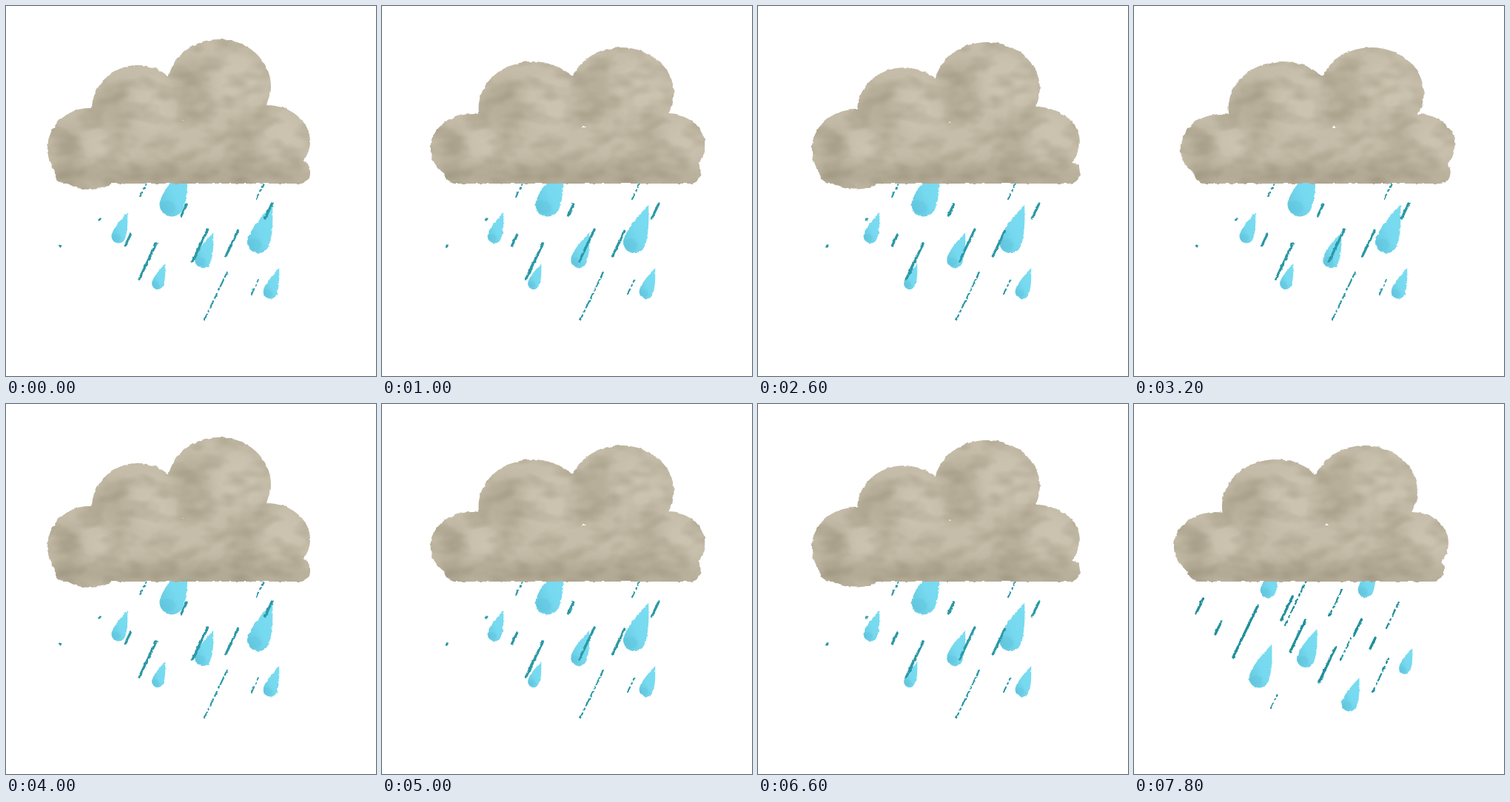
Recreate the animation shown at these times as an HTML page. Size 500 by 500 pixels, loop 8010 ms.

```html
<!DOCTYPE html>
<html lang="en">
<head>
<meta charset="utf-8">
<title>Rain cloud</title>
<style>
  html, body { margin: 0; width: 100%; height: 100%; overflow: hidden; background: #fff; }
  svg { display: block; width: 100vw; height: 100vh; }
</style>
</head>
<body>
<svg id="stage" viewBox="0 0 500 500">
  <defs>
    <filter id="paper" x="-5%" y="-5%" width="110%" height="110%" color-interpolation-filters="sRGB">
      <feTurbulence class="noise" type="fractalNoise" baseFrequency="0.12" numOctaves="2"/>
      <feColorMatrix values="1 0 0 0 0  0 1 0 0 0  0 0 1 0 0  0 0 0 0 1" result="edge"/>
      <feDisplacementMap in="SourceGraphic" in2="edge" scale="4" xChannelSelector="R" yChannelSelector="G" result="shape"/>
      <feTurbulence type="fractalNoise" baseFrequency="0.03 0.05" numOctaves="2" seed="9"/>
      <feColorMatrix values="0 0 0 0 .42  0 0 0 0 .38  0 0 0 0 .28  .5 0 0 0 -.2"/>
      <feComposite in2="shape" operator="in" result="wash"/>
      <feMerge><feMergeNode in="shape"/><feMergeNode in="wash"/></feMerge>
    </filter>
    <filter id="rough" x="-5%" y="-5%" width="110%" height="110%" color-interpolation-filters="sRGB">
      <feTurbulence class="noise" type="fractalNoise" baseFrequency="0.2" numOctaves="2"/>
      <feColorMatrix values="1 0 0 0 0  0 1 0 0 0  0 0 1 0 0  0 0 0 0 1" result="edge"/>
      <feDisplacementMap in="SourceGraphic" in2="edge" scale="3" xChannelSelector="R" yChannelSelector="G"/>
    </filter>
    <filter id="soft" x="-60%" y="-60%" width="220%" height="220%">
      <feGaussianBlur stdDeviation="9"/>
    </filter>
    <linearGradient id="water" x1="0.7" y1="0" x2="0.3" y2="1">
      <stop offset="0" stop-color="#7bddf1"/>
      <stop offset=".6" stop-color="#76d9ef"/>
      <stop offset="1" stop-color="#64c8df"/>
    </linearGradient>
  </defs>
</svg>
<script>
const NS = 'http://www.w3.org/2000/svg';
const stage = document.getElementById('stage');
const STEP = 200, LOOP = 8010, DRIFT = 2.9, FLOOR = 239, SLANT = .48;

function add(parent, tag, attrs = {}) {
  const el = document.createElementNS(NS, tag);
  for (const k in attrs) el.setAttribute(k, attrs[k]);
  return parent.appendChild(el);
}

// Every tear leans the same way; its length follows from its radius
const LEAN = Math.atan2(1.3, 3.4) * 180 / Math.PI;
function drop(parent, [x, y, r]) {
  const len = 3.6 * r;
  const d = `M0 ${-len}C${r * .42} ${-len * .7} ${r} ${-len * .34} ${r} 0` +
    `A${r} ${r} 0 0 1 ${-r} 0C${-r} ${-len * .34} ${-r * .42} ${-len * .7} 0 ${-len}Z`;
  const g = add(parent, 'g', { transform: `translate(${x} ${y}) rotate(${LEAN})` });
  add(g, 'path', { d, fill: 'url(#water)' });
  add(g, 'ellipse', { cx: -r * .2, cy: r * .3, rx: r * .6, ry: r * .5, fill: '#58bdd7', opacity: .25 });
}

// Streak: lower end and height
function streak(parent, [x, y, h], dashed) {
  add(parent, 'line', {
    x1: x, y1: y, x2: x + h * SLANT, y2: y - h,
    'stroke-width': dashed ? 2.2 : 3.3,
    'stroke-dasharray': dashed ? '7 5 2 4 10 4' : 'none'
  });
}

function makeRain({ drops, still, blown, color }) {
  const el = add(stage, 'g', { stroke: 'none' });
  const layer = attrs => add(el, 'g', { filter: 'url(#rough)', 'stroke-linecap': 'round', ...attrs });
  const tears = layer(), fixed = layer({ stroke: color });
  const mover = add(el, 'g');
  const wind = mover.appendChild(layer({ stroke: color }));
  drops.forEach(d => drop(tears, d));
  still.forEach(s => streak(fixed, s, true));
  blown.forEach(s => streak(wind, s, false));
  return { el, mover };
}

// Lobes are ellipses; a body and a foot join them
function makeCloud({ lobes, foot: [left, right], squash }, i) {
  const el = add(stage, 'g');
  const paint = add(add(el, 'g', { filter: 'url(#paper)' }), 'g', {
    transform: `translate(232 ${FLOOR}) scale(${2 - squash} ${squash}) translate(-232 ${-FLOOR})`
  });
  const cut = add(paint, 'clipPath', { id: 'cut' + i });
  const [first, last] = [lobes[0], lobes[lobes.length - 1]];
  const top = first[1] - first[3] + 18;
  lobes.forEach(([cx, cy, rx, ry]) => add(cut, 'ellipse', { cx, cy, rx, ry }));
  add(cut, 'rect', { x: first[0], y: top, width: last[0] - first[0], height: FLOOR - top });
  add(cut, 'rect', { x: left, y: 209, width: right - left, height: FLOOR - 208, rx: 14 });

  const wash = add(paint, 'g', { 'clip-path': `url(#cut${i})` });
  add(wash, 'rect', { width: 500, height: 260, fill: '#c5bda9' });
  const blot = (cx, cy, rx, ry, fill, opacity) =>
    add(wash, 'ellipse', { cx, cy, rx, ry, fill, opacity, filter: 'url(#soft)' });
  for (const [x, y, rx, ry] of lobes) {
    blot(x - rx * .5, y, rx * .4, ry * .6, '#a29983', .38);
    blot(x + rx * .35, y - ry * .1, rx * .55, ry * .6, '#cfc8b5', .55);
  }
  blot(232, 229, 190, 17, '#a29983', .55);
  return { el, mover: el };
}

const rains = [
  { color: '#2b98a5',
    drops: [[224, 268, 16.5], [341, 319, 15], [152, 311, 9.5], [266, 343, 11], [205, 375, 8], [357, 386, 9.5]],
    still: [[181, 258, 17], [338, 261, 20], [268, 424, 64], [332, 389, 18]],
    blown: [[73, 325, 1], [126, 289, 1], [161, 324, 15], [180, 369, 48], [237, 283, 15],
      [252, 345, 43], [297, 338, 34], [350, 287, 20]] },
  { color: '#1f8f9b',
    drops: [[181, 252, 10.5], [313, 251, 10.5], [169, 370, 13.5], [232, 344, 12], [291, 405, 10.5], [366, 357, 8]],
    still: [[204, 299, 60], [264, 286, 36], [341, 303, 35], [279, 346, 29], [322, 390, 46], [185, 411, 18]],
    blown: [[81, 283, 20], [107, 311, 17], [131, 342, 69], [196, 292, 32], [208, 335, 43],
      [247, 376, 47], [294, 313, 22], [316, 331, 15]] }
].map(makeRain);

const tall = { foot: [66, 411], lobes: [[113, 193, 57, 55], [178, 140, 62, 60], [288, 109, 70, 64], [352, 183, 59, 49]] };
const wide = { foot: [70, 416], lobes: [[107, 192, 56, 46], [189, 138, 73, 63], [309, 118, 71, 62], [373, 188, 49, 42]] };
const clouds = [
  { ...tall, squash: 1 }, { ...tall, squash: .98 }, { ...wide, squash: 1 }
].map(makeCloud);

function show(list, index, shift) {
  list.forEach(({ el }, i) => { el.style.display = i === index ? '' : 'none'; });
  list[index].mover.setAttribute('transform', `translate(${shift} 0)`);
}

const noises = document.querySelectorAll('.noise');
let last = -1;
function draw(time) {
  const step = Math.min(39, Math.floor(time % LOOP / STEP)) % 20;
  if (step === last) return;
  last = step;
  // Sway out and back; cloud redrawn every second, rain every other pair
  const shift = DRIFT * (10 - Math.abs(10 - step));
  const isWide = Math.floor(step / 5) % 2;
  show(clouds, isWide ? 2 : step % 2, shift);
  show(rains, Math.floor(step / 2) % 2, shift);
  noises.forEach(n => n.setAttribute('seed', 3 + step % 4));
}

const start = performance.now();
function tick() {
  draw(performance.now() - start);
  requestAnimationFrame(tick);
}
tick();
</script>
</body>
</html>
```
